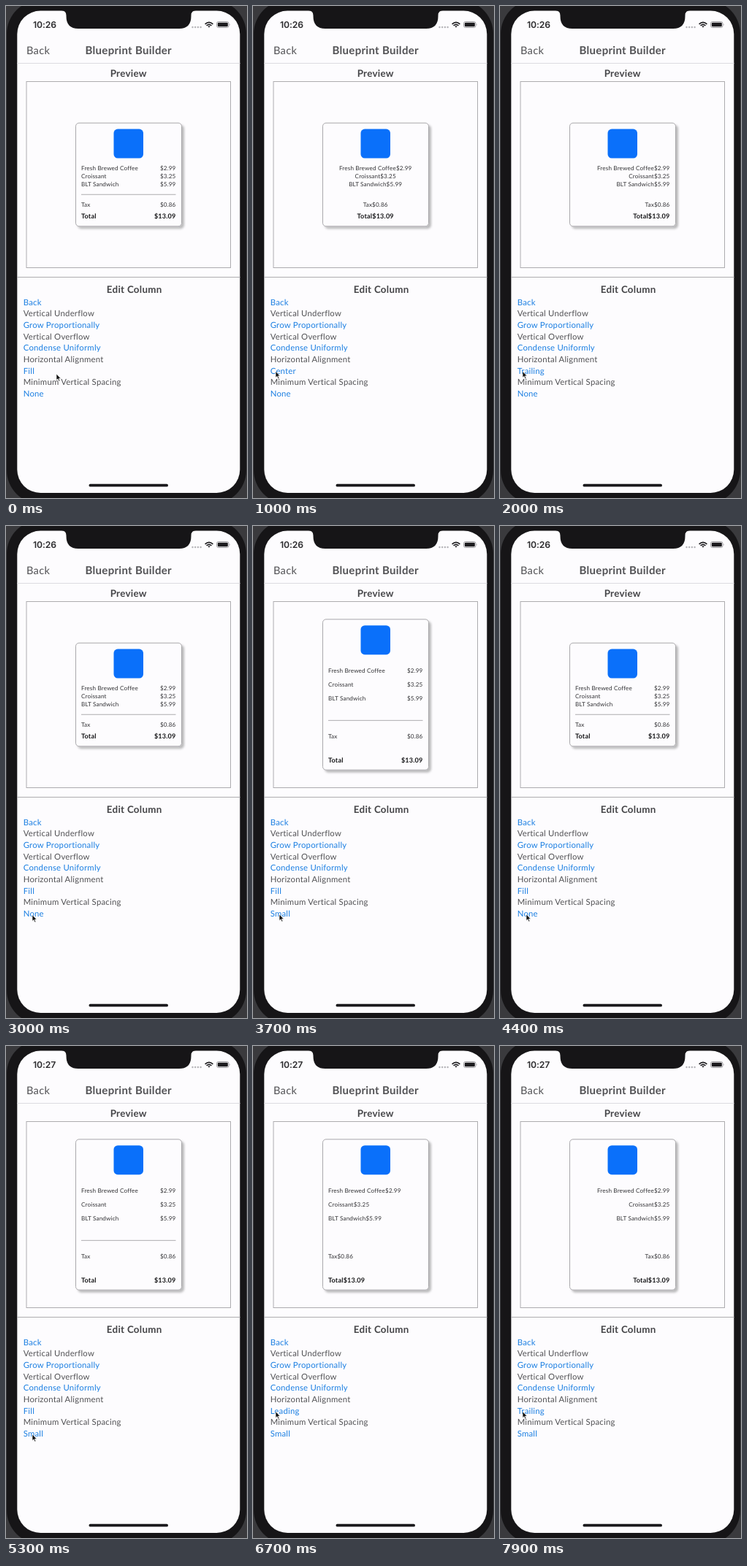
These frames come from a looping animation (330 by 674 pixels, 8000 ms). An HTML page:

```html
<!DOCTYPE html>
<html lang="en">
<head>
<meta charset="utf-8">
<title>Blueprint Builder</title>
<style>
  html, body { margin: 0; width: 100%; height: 100%; overflow: hidden; background: #3a3a3d; }
  svg { display: block; width: 100%; height: 100%; }
  text { font-family: Lato, "Open Sans", sans-serif; fill: #515154; letter-spacing: .02em; text-rendering: geometricPrecision; }
  .clock { font: 600 12.2px Inter, Roboto, sans-serif; fill: #2b2a2d; letter-spacing: -.01em; }
  .nav { font-size: 14.6px; }
  .title { font-size: 15px; font-weight: 700; text-anchor: middle; }
  .head { font-size: 13.4px; font-weight: 700; text-anchor: middle; fill: #454548; }
  .list text { font-size: 11.35px; }
  .list .link { fill: #1b7fe2; }
  .row { font-size: 8.15px; fill: #333336; }
  .row.bold { font-size: 9.1px; font-weight: 700; fill: #161618; }
  .line { fill: none; stroke: #adacaf; }
</style>
</head>
<body>
<svg viewBox="0 0 330 674" preserveAspectRatio="none">
  <defs>
    <clipPath id="pane"><rect x="15" y="79" width="306" height="292"/></clipPath>
    <filter id="shade" x="-20%" y="-20%" width="140%" height="140%">
      <feDropShadow dx="3" dy="3" stdDeviation="1.6" flood-color="#000" flood-opacity=".26"/>
    </filter>
  </defs>

  <rect x="1" y="-8" width="328" height="690" rx="46" fill="#161517"/>
  <rect x="15.3" y="6.5" width="305" height="660.5" rx="32" fill="#fdfcfe"/>
  <path d="M76 6H260Q253.500 6.500 253.500 13V14Q253.500 31 237 31H99Q82.500 31 82.500 14V13Q82.500 6.500 76 6Z" fill="#161517"/>

  <text id="clock" class="clock" x="37" y="30"></text>
  <g fill="#b5b4b8">
    <circle cx="255.500" cy="29" r="1.200"/><circle cx="259.200" cy="29" r="1.200"/>
    <circle cx="262.900" cy="29" r="1.200"/><circle cx="266.600" cy="29" r="1.200"/>
  </g>
  <g fill="none" stroke="#1c1b1e" stroke-width="1.700">
    <path d="M272.600 24.800Q278 19.800 283.400 24.800"/>
    <path d="M274.600 27Q278 23.800 281.400 27"/>
    <path d="M276.400 27.900Q278 26.600 279.600 27.900L278 29.600Z" fill="#1c1b1e" stroke="none"/>
  </g>
  <rect x="288.500" y="21.500" width="16.500" height="8" rx="2.400" fill="none" stroke="#8d8c90" stroke-width=".8"/>
  <rect x="289.800" y="22.800" width="14" height="5.400" rx="1.300" fill="#1c1b1e"/>
  <path d="M306 24.200Q307.300 25.500 306 26.800Z" fill="#8d8c90"/>

  <text class="nav" x="28" y="65.500">Back</text>
  <text class="title" x="167.700" y="65.500">Blueprint Builder</text>
  <path d="M15 78.500H320.500" stroke="#dddce0"/>

  <g clip-path="url(#pane)">
    <text class="head" x="167.700" y="97">Preview</text>
    <rect id="box" class="line" x="28" width="279.500" style="fill:#fdfcfe"/>
    <g id="card">
      <rect id="sheet" x="95.500" y="0" width="145" rx="4.500" fill="#fdfcfe" stroke="#a9a8ab" filter="url(#shade)"/>
      <rect x="147.500" y="8.300" width="40.500" height="40" rx="5.500" fill="#0a70fa"/>
      <path id="rule" class="line" d="M103 0H232.500"/>
    </g>
  </g>

  <path d="M15 371.500H320.500" class="line"/>
  <text class="head" x="175.700" y="393">Edit Column</text>
  <g id="list" class="list"></g>

  <rect x="113.500" y="654.800" width="108.500" height="3.800" rx="1.900" fill="#1a191c"/>
  <path id="cursor" d="M0 0V8.600L2 6.800L3.400 10L4.800 9.400L3.400 6.300H6Z" fill="#111" stroke="#fff" stroke-width=".6"/>
</svg>
<script>
const LOOP = 8000;
const $ = id => document.getElementById(id);

function add(parent, cls, x, y) {
  const el = document.createElementNS("http://www.w3.org/2000/svg", "text");
  el.setAttribute("class", cls);
  el.setAttribute("x", x);
  el.setAttribute("y", y);
  return parent.appendChild(el);
}

// Label, price, baseline inside the card, number of gaps above
const rows = [
  ["Fresh Brewed Coffee", "$2.99", 64.700, 1],
  ["Croissant", "$3.25", 75.700, 2],
  ["BLT Sandwich", "$5.99", 86.700, 3],
  ["Tax", "$0.86", 114.700, 6],
  ["Total", "$13.09", 131, 8]
].map(([label, price, y, gaps]) => {
  const cls = label === "Total" ? "row bold" : "row";
  return { label, price, y, gaps, name: add($("card"), cls, 0, 0), cost: add($("card"), cls, 232.500, 0) };
});

const lines = ["Back", "Vertical Underflow", "Grow Proportionally", "Vertical Overflow",
  "Condense Uniformly", "Horizontal Alignment", "Fill", "Minimum Vertical Spacing", "None"
].map((text, i) => {
  const el = add($("list"), i % 2 ? "" : "link", 23.700, 409.500 + i * 15.680);
  el.textContent = text;
  return el;
});

const aligns = {
  Fill: ["start", 103],
  Center: ["middle", 167.700],
  Leading: ["start", 103],
  Trailing: ["end", 232.500]
};
const gapSizes = { None: 0, Small: 8.100, Large: 16.200 };

// Start time, alignment, spacing, clock
const states = [
  [0, "Fill", "None", "10:26"],
  [700, "Center", "None", "10:26"],
  [1200, "Leading", "None", "10:26"],
  [1700, "Trailing", "None", "10:26"],
  [2300, "Fill", "None", "10:26"],
  [3400, "Fill", "Small", "10:26"],
  [4000, "Fill", "Large", "10:26"],
  [4300, "Fill", "None", "10:26"],
  [5100, "Fill", "Small", "10:27"],
  [6000, "Center", "Small", "10:27"],
  [6500, "Leading", "Small", "10:27"],
  [7400, "Trailing", "Small", "10:27"]
];

// Pointer stops: time, x, y
const stops = [
  [0, 69, 504], [50, 69, 504], [250, 52, 517], [500, 31, 500.500],
  [2450, 31, 500.500], [2800, 36, 535], [3100, 36, 532],
  [5450, 36, 532], [5850, 31, 500.800], [LOOP, 31, 500.800]
];

let shown = null;

function show(state) {
  if (state === shown) return;
  shown = state;
  const [, align, spacing, clock] = state;
  const gap = gapSizes[spacing];
  const height = 141.500 + 8 * gap;
  const fill = align === "Fill";
  const [anchor, x] = aligns[align];

  $("clock").textContent = clock;
  lines[6].textContent = align;
  lines[8].textContent = spacing;

  const grown = spacing === "Large";
  $("box").setAttribute("y", grown ? 70 : 103.500);
  $("box").setAttribute("height", grown ? 322 : 255);
  $("card").setAttribute("transform", `translate(0 ${231 - height / 2})`);
  $("sheet").setAttribute("height", height);
  $("rule").setAttribute("transform", `translate(0 ${98 + 5 * gap})`);
  $("rule").style.display = fill ? "" : "none";

  for (const r of rows) {
    const y = r.y + r.gaps * gap;
    r.name.setAttribute("x", x);
    r.name.setAttribute("y", y);
    r.name.setAttribute("text-anchor", anchor);
    r.name.textContent = fill ? r.label : r.label + r.price;
    r.cost.setAttribute("y", y);
    r.cost.setAttribute("text-anchor", "end");
    r.cost.textContent = fill ? r.price : "";
  }
}

function movePointer(t) {
  const i = stops.findIndex(s => s[0] > t);
  const [t0, x0, y0] = stops[i - 1], [t1, x1, y1] = stops[i];
  const p = (t - t0) / (t1 - t0);
  const e = p * p * (3 - 2 * p);
  $("cursor").setAttribute("transform", `translate(${x0 + (x1 - x0) * e} ${y0 + (y1 - y0) * e})`);
}

function draw() {
  const t = performance.now() % LOOP;
  show(states.findLast(s => s[0] <= t));
  movePointer(t);
  requestAnimationFrame(draw);
}
draw();
</script>
</body>
</html>
```
